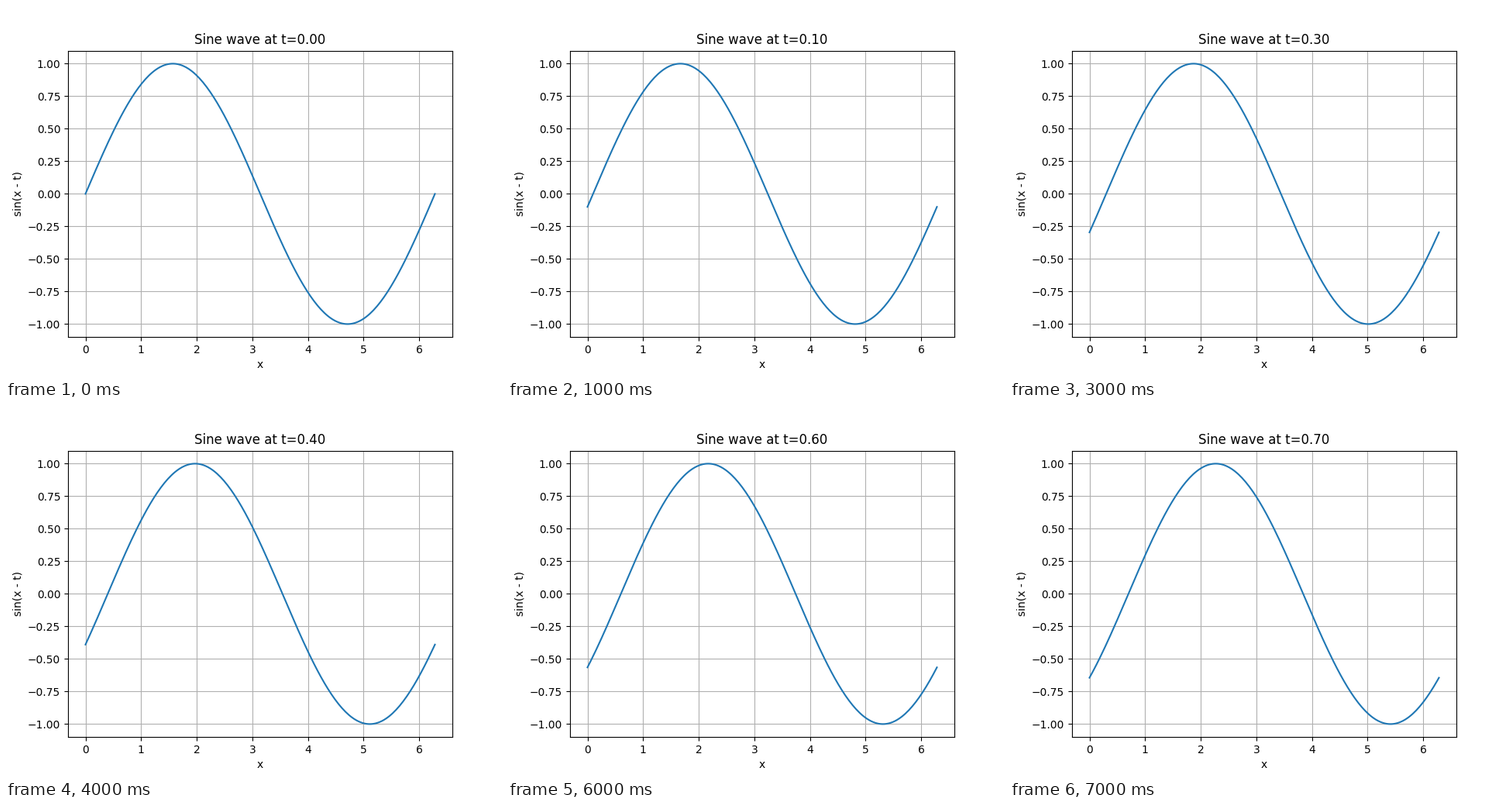
A matplotlib script that plays this animation: 640x480 px, repeating every 8 s.

```python
import numpy as np
import matplotlib.pyplot as plt
from matplotlib.animation import FuncAnimation

FRAMES = 8
INTERVAL = 1000  # ms
TIME_STEP = 0.1

x = np.linspace(0, 2 * np.pi, 200)

fig, ax = plt.subplots(figsize=(6.4, 4.8), dpi=100)
line, = ax.plot(x, np.sin(x))
margin = 0.05 * 2 * np.pi
ax.set_xlim(-margin, 2 * np.pi + margin)
ax.set_ylim(-1.1, 1.1)
ax.set_xlabel("x")
ax.set_ylabel("sin(x - t)")
ax.grid(True)
title = ax.set_title("Sine wave at t=0.00")


def update(frame):
    t = frame * TIME_STEP
    line.set_ydata(np.sin(x - t))
    title.set_text(f"Sine wave at t={t:.2f}")
    return line, title


anim = FuncAnimation(fig, update, frames=FRAMES, interval=INTERVAL,
                     repeat=True, repeat_delay=0, blit=False)
plt.show()
```
